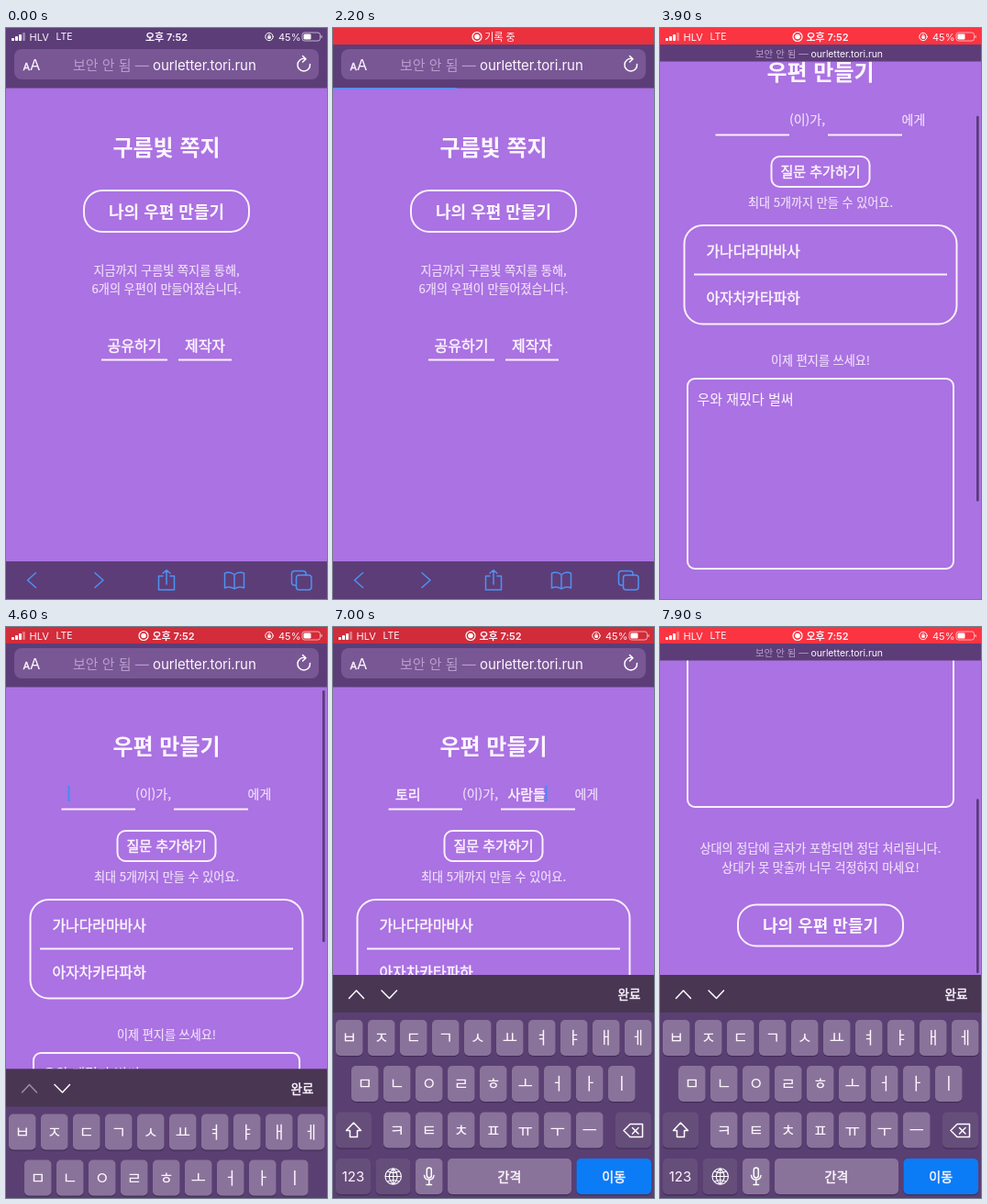
Write an HTML page that moves like this. It is 350 px wide and 622 px high and loops after 8000 ms.

```html
<!DOCTYPE html>
<html lang="ko">
<head>
<meta charset="utf-8">
<title>우편 만들기</title>
<style>
html, body { margin: 0; width: 100%; height: 100%; overflow: hidden; background: #aa72e2; }
svg { display: block; width: 100vw; height: 100vh; }
text { font-family: "Noto Sans CJK KR", "Noto Sans CJK", sans-serif; fill: #fdf5ff; white-space: pre; }
.ui text { font-family: Inter, "Noto Sans CJK KR", "Noto Sans CJK", sans-serif; }
.soft { fill: #f0dffb; stroke: #f0dffb; stroke-width: 0.2; }
.medium { stroke: #fdf5ff; stroke-width: 0.45; }
.line { fill: none; stroke: #fbeeff; stroke-width: 2; }
.icon { fill: none; stroke: #4c93f4; stroke-width: 1.5; stroke-linecap: round; stroke-linejoin: round; }
.white { stroke: #fff; }
</style>
</head>
<body>
<svg id="stage" viewBox="0 0 350 622"></svg>
<script>
const LOOP = 8000, STEP = 100;

// y is the vertical middle of the text
const text = (x, y, size, str, attrs = '') =>
  `<text x="${x}" y="${y + size * 0.37}" font-size="${size}" ${attrs}>${str}</text>`;
const mid = (x, y, size, str, attrs = '') => text(x, y, size, str, 'text-anchor="middle" ' + attrs);
const rect = (x, y, w, h, r, attrs) =>
  `<rect x="${x}" y="${y}" width="${w}" height="${h}" rx="${r}" ${attrs}/>`;
const path = (d, attrs = 'class="icon"') => `<path d="${d}" ${attrs}/>`;
const group = (id, body, attrs = '') => `<g id="${id}" ${attrs}>${body}</g>`;
const LINE = 'class="line"', SOFT = 'class="soft"', BOLD = 'font-weight="700"', MEDIUM = 'class="medium"';
const WHITE = 'class="icon white"';

const makeButton = y => rect(85, y, 180, 45, 20, LINE) + mid(175, y + 23, 18, '나의 우편 만들기', BOLD);

const home = mid(175, 130, 24, '구름빛 쪽지', BOLD) + makeButton(177) +
  mid(175, 264, 13.1, '지금까지 구름빛 쪽지를 통해,', SOFT) +
  mid(175, 284.5, 13.1, '6개의 우편이 만들어졌습니다.', SOFT) +
  mid(140, 346.5, 16, '공유하기', MEDIUM) + mid(217, 346.5, 16, '제작자', MEDIUM) +
  path('M104 361.5H176M188 361.5H246', LINE);

const form = mid(175, 130, 24, '우편 만들기', BOLD) +
  text(141, 182, 14, '(이)가,', SOFT) + text(263.5, 182, 14, '에게', SOFT) +
  path('M60.5 198.5H141M183 198.5H264', LINE) +
  text(68, 182, 15, '', 'id="sender" ' + MEDIUM) + text(190.5, 182, 15, '', 'id="receiver" ' + MEDIUM) +
  rect(0, 173, 2, 17, 0, 'id="caret" fill="#3f8df5"') +
  rect(121.5, 222, 107, 33, 9, LINE) + mid(175, 238.5, 15, '질문 추가하기', MEDIUM) +
  mid(175, 272.5, 13.1, '최대 5개까지 만들 수 있어요.', SOFT) +
  rect(26.5, 297, 297, 107.5, 20, LINE) + path('M37 350.5H313', LINE) +
  text(50.5, 325, 15.9, '가나다라마바사', MEDIUM) + text(50.5, 376, 15.9, '아자차카타파하', MEDIUM) +
  mid(175, 444, 13.1, '이제 편지를 쓰세요!', SOFT) +
  rect(30, 464, 290, 207, 8, LINE) + text(40.5, 486.5, 15, '우와 재밌다 벌써') +
  mid(175, 716.5, 13.1, '상대의 정답에 글자가 포함되면 정답 처리됩니다.', SOFT) +
  mid(175, 737, 13.1, '상대가 못 맞출까 너무 걱정하지 마세요!', SOFT) + makeButton(777.5);

const header = rect(0, 0, 350, 66, 0, 'id="headerBg" fill="#5c3d78"') +
  group('field', rect(9, 23, 332, 33, 8, 'fill="#795795"') +
    text(18.5, 41.5, 11, 'A', MEDIUM) + text(26, 39.7, 16.5, 'A') +
    path('M326 33.5A6.8 6.8 0 1 0 331.5 39.5M323.5 30.5L327 33.7L323.5 37', WHITE)) +
  group('address', text(-102, 0, 15, '보안 안 됨 —', 'style="fill:#b89ccc"') +
    text(-15, 0, 15, 'ourletter.tori.run', 'letter-spacing="-.1"')) +
  rect(0, 0, 0, 1.5, 0, 'id="progress" fill="#4a94f8"');

const recIcon = x => `<circle cx="${x}" cy="9.5" r="5" ${WHITE} style="stroke-width:1.2"/><circle cx="${x}" cy="9.5" r="2.8" fill="#fff"/>`;
const bars = [0, 1, 2, 3].map(i =>
  rect(6 + i * 4, 11 - i * 2, 3, 3 + i * 2, 0.7, `fill="#fff" opacity="${i < 3 ? 1 : 0.35}"`)).join('');
const status = rect(0, 0, 350, 18, 0, 'id="redBar"') +
  group('details', bars + text(25.5, 9.5, 11, 'HLV') + text(54.5, 9.5, 10.5, 'LTE') +
    `<circle cx="287" cy="9.5" r="4.2" ${WHITE} style="stroke-width:1"/>` +
    rect(285.3, 9, 3.5, 2.8, 0.5, 'fill="#fff"') + path('M286 9V8.3A1 1 0 0 1 288 8.3V9', 'fill="none" stroke="#fff"') +
    text(297, 9.5, 11, '45%') +
    rect(323, 5, 19.5, 9, 2.5, 'fill="none" stroke="#fff" opacity=".6"') +
    rect(324.5, 6.5, 8, 6, 1.2, 'fill="#fff"') + rect(343.5, 8, 1.3, 3, 0.6, 'fill="#fff" opacity=".6"')) +
  mid(175, 9.5, 11, '오후 7:52', 'id="clock" font-weight="600"') +
  group('recClock', recIcon(150) + mid(182.5, 9.5, 11, '오후 7:52', 'font-weight="600"')) +
  group('recLabel', recIcon(157) + mid(182, 9.5, 11, '기록 중'));

const toolbar = rect(0, 581, 350, 41, 0, 'fill="#5d3d78"') +
  path('M32.5 593.5L23.5 601.5L32.5 609.5M97 593.5L106 601.5L97 609.5') +
  path('M171 597H166.5V612H183.5V597H179M175 606V590.5M171 594L175 590.5L179 594') +
  path('M249 595.5Q244 591.5 238.5 594V610Q244 607.5 249 611Q254 607.5 259.5 610V594Q254 591.5 249 595.5V611') +
  rect(316.5, 596, 16.5, 16, 3, 'class="icon"') +
  path('M316 607H314.5A3 3 0 0 1 311.5 604V594.5A3 3 0 0 1 314.5 591.5H324A3 3 0 0 1 327 594.5V596');

const LIGHT = '#8a739a', DARK = '#664e7a';
const key = (x, y, w, label, fill = LIGHT, size = 18, attrs = '') =>
  rect(x, y + 1.2, w, 39, 5, 'fill="#432d58"') + rect(x, y, w, 39, 5, `fill="${fill}"`) +
  mid(x + w / 2, y + 19.5, size, label, attrs);
const keyRow = (x, y, letters) => [...letters].map((c, i) => key(x + i * 35, y, 29.5, c)).join('');
const keyboard = rect(0, 379, 350, 243, 0, 'fill="#5a3f73"') + rect(0, 379, 350, 41, 0, 'fill="#483653"') +
  path('M17.5 404.5L25.5 396L33.5 404.5', WHITE + ' id="prev"') + path('M53 396L61.5 404.5L69.5 396', WHITE) +
  mid(323, 400, 13.5, '완료', MEDIUM) +
  keyRow(3, 428, 'ㅂㅈㄷㄱㅅㅛㅕㅑㅐㅔ') + keyRow(20, 478, 'ㅁㄴㅇㄹㅎㅗㅓㅏㅣ') + keyRow(55, 528.5, 'ㅋㅌㅊㅍㅠㅜㅡ') +
  key(3, 528.5, 39, '', DARK) + path('M22.5 540L14.5 548.5H18.5V555.5H26.5V548.5H30.5Z', WHITE) +
  key(308, 528.5, 39, '', DARK) +
  path('M324 541.5H337.5V555.5H324L317 548.5ZM326.5 545.5L333 552M333 545.5L326.5 552', WHITE) +
  key(3, 579, 38, '123', DARK, 15) + key(46.5, 579, 38, '', DARK) + key(90, 579, 29.5, '') +
  path('M57 598.5A8.7 8.7 0 1 0 74.4 598.5A8.7 8.7 0 1 0 57 598.5H74.4M65.7 589.8V607.2' +
    'M65.7 589.8Q57 598.5 65.7 607.2Q74.4 598.5 65.7 589.8M59.5 593Q65.7 596 72 593M59.5 604Q65.7 601 72 604',
    WHITE + ' style="stroke-width:1.1"') +
  rect(102.3, 589, 5, 11, 2.5, WHITE) + path('M99.5 597.5A5.3 5.3 0 0 0 110 597.5M104.8 603V607.5M102 607.5H107.5', WHITE) +
  key(125, 579, 135, '간격', LIGHT, 14, MEDIUM) + key(265.5, 579, 81.5, '이동', '#0b7cf6', 14, MEDIUM);

stage.innerHTML = rect(0, 0, 350, 622, 0, 'fill="#aa72e2"') +
  group('homePage', home) + group('formPage', form) +
  rect(345, 0, 2.7, 0, 1.4, 'id="thumb" fill="#5b3a7d"') +
  group('tools', toolbar) + group('keys', keyboard, 'class="ui"') +
  group('header', header, 'class="ui"') + group('status', status, 'class="ui"');

const $ = id => document.getElementById(id);
const set = (id, attrs) => { for (const k in attrs) $(id).setAttribute(k, attrs[k]); };
const show = (id, on) => set(id, { display: on ? 'inline' : 'none' });
const mix = (a, b, p) => a + (b - a) * p;

// piecewise linear value from a flat list: time, value, time, value...
function track(t, ...p) {
  if (t <= p[0]) return p[1];
  for (let i = 2; i < p.length; i += 2)
    if (t <= p[i]) return mix(p[i - 1], p[i + 1], (t - p[i - 2]) / (p[i] - p[i - 2]));
  return p[p.length - 1];
}
const typed = (t, start, gap, stages) =>
  t < start ? '' : stages[Math.min(stages.length - 1, Math.floor((t - start) / gap))];

function draw(t) {
  const scroll = track(t, 2700, 0, 3000, 151, 3150, 195, 3300, 210, 3500, 200, 3900, 82, 4200, 0,
    7200, 0, 7400, 90, 7600, 290, 7800, 450, 7900, 475);
  const fold = track(t, 2750, 0, 3000, 0.93, 3100, 1, 3900, 1, 4200, 0, 7200, 0, 7450, 1);
  const kb = 1 - (1 - track(t, 4500, 0, 4900, 1)) ** 3;
  const onForm = t >= 2300, recording = t >= 300;

  show('homePage', !onForm);
  show('formPage', onForm);
  set('formPage', { transform: `translate(0 ${-scroll})` });

  const bottom = mix(65.5, 36.5, fold);
  set('headerBg', { height: bottom });
  set('field', { opacity: Math.max(0, 1 - fold * 1.6) });
  set('address', { transform: `translate(175 ${mix(40.1, 28, fold)}) scale(${mix(1, 0.696, fold)})` });
  set('progress', { y: bottom - 0.5, width: track(t, 1900, 0, 2300, 180, 2800, 350), opacity: track(t, 3100, 1, 3300, 0) });
  set('tools', { transform: `translate(0 ${track(t, 2750, 0, 3000, 38, 3100, 42, 3900, 42, 4200, 0)})` });
  set('keys', { transform: `translate(0 ${243 * (1 - kb)})` });
  set('prev', { opacity: t < 5900 ? 0.45 : 1 });

  set('thumb', {
    y: bottom + 3.5 + scroll * mix(0.68, 0.31, kb),
    height: mix(420, mix(168, 190, fold), kb),
    opacity: track(t, 2650, 0, 2750, 1, 5600, 1, 5900, 0, 7150, 0, 7250, 1)
  });

  const sender = typed(t, 5000, 130, ['ㅌ', '토', '톨', '토리']);
  const receiver = typed(t, 6200, 100, ['ㅅ', '사', '살', '사라', '사람', '사람ㄷ', '사람드', '사람들']);
  $('sender').textContent = sender;
  $('receiver').textContent = receiver;
  show('caret', t >= 4600);
  set('caret', { x: t < 5900 ? 67.5 + sender.length * 13.8 : 190 + receiver.length * 13.8 });

  const pulse = ((1 + Math.cos((t - 3900) / 1000 * Math.PI)) / 2) ** 2;
  const red = [[209, 251], [44, 52], [58, 65]].map(([a, b]) => Math.round(mix(a, b, pulse)));
  show('redBar', recording);
  set('redBar', { fill: `rgb(${red})` });
  const label = recording && t < 3500;
  show('details', !label);
  show('clock', !recording);
  show('recLabel', label);
  show('recClock', recording && !label);
}

function tick() {
  draw(Math.floor(performance.now() % LOOP / STEP) * STEP);
  requestAnimationFrame(tick);
}
tick();
</script>
</body>
</html>
```
